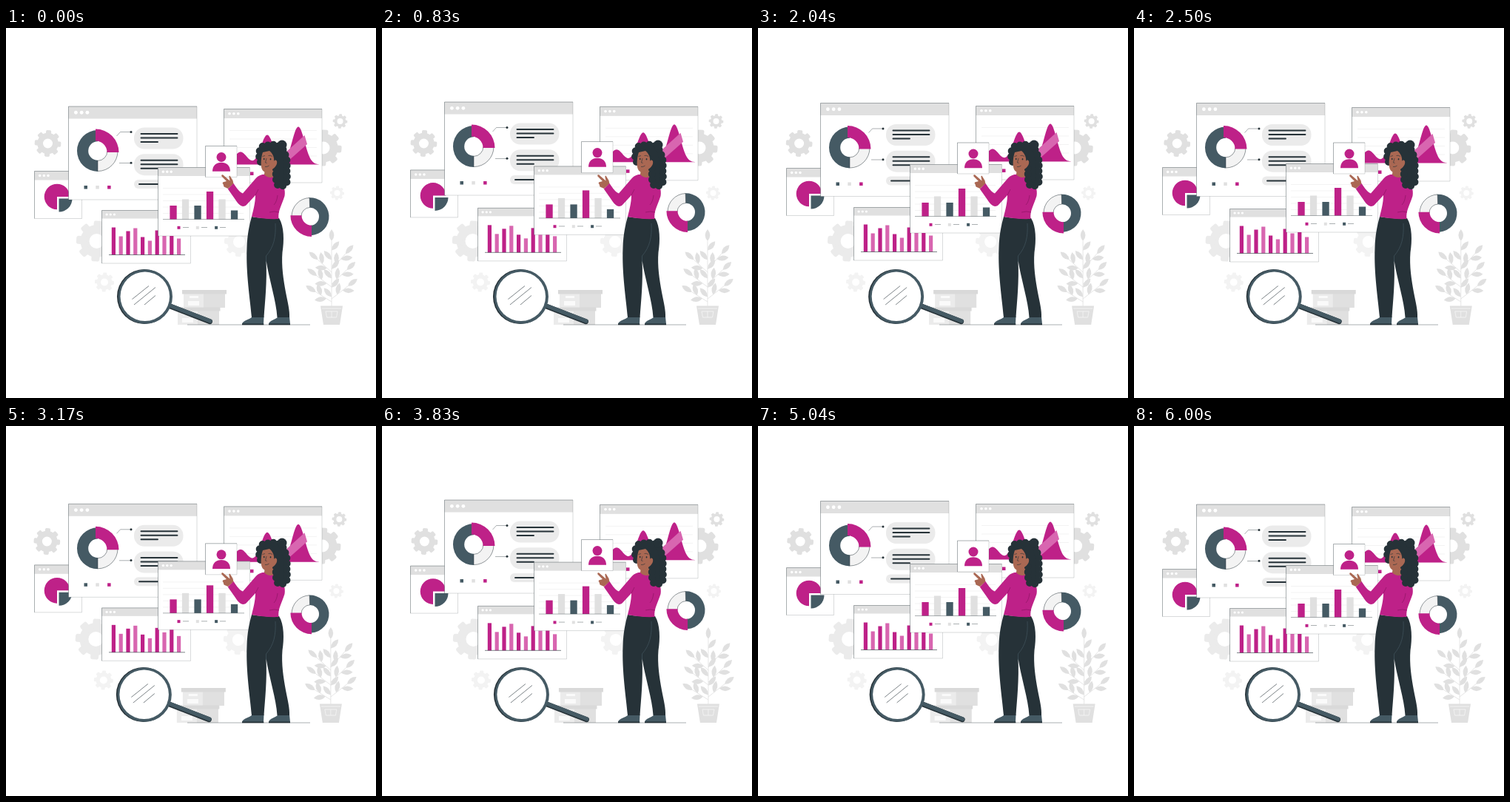
An HTML page for the animation above (6.04 s loop, 500 by 500 pixels).

```html
<!DOCTYPE html>
<html lang="en">
<head>
<meta charset="utf-8">
<title>Data dashboard</title>
<style>
  html, body { margin: 0; width: 100%; height: 100%; overflow: hidden; background: #fff; }
  svg { display: block; width: 100vw; height: 100vh; }
  .pink { fill: #be2188; }
  .tint { fill: #d866b0; }
  .slate { fill: #455a64; }
  .dark { fill: #263238; }
  .g1 { fill: #e0e0e0; }
  .g2 { fill: #ebebeb; }
  .g3 { fill: #f3f3f3; }
  .rim { fill: #f3f3f3; stroke: #263238; stroke-width: .5; }
  .white { fill: #fff; }
  .skin { fill: #aa6853; }
  .line { fill: none; stroke: #263238; stroke-width: .6; }
  .soft { fill: none; stroke: #263238; stroke-width: .6; opacity: .65; }
  .faint { fill: none; stroke: #263238; stroke-width: .35; opacity: .5; }
  .grid { fill: none; stroke: #ebebeb; stroke-width: .6; }
  .twig { fill: none; stroke: #e0e0e0; stroke-width: .8; }
  .text { fill: none; stroke: #263238; stroke-width: 1.9; stroke-linecap: round; }
  .hair { fill: #263238; stroke: #263238; stroke-width: 10; stroke-linecap: round; stroke-dasharray: 0 7.5; }
</style>
</head>
<body>
<svg viewBox="0 0 500 500">
  <g data-move="sway">
    <g id="gears"></g>
    <path class="g2" d="M240 359h56v19h-56zM232 381h56v20h-56z"/>
    <path class="g1" d="M267 359h29v19h-29zM259 381h29v20h-29z"/>
    <path fill="#d9d9d9" d="M238 354h60v5.500h-60zM231 377.500h58.500v5h-58.500z"/>
    <path class="white" opacity=".75" d="M248 362h12v3h-12zM246 369h15v6h-15zM239 385h12v3h-12zM238 392h15v6h-15z"/>
    <g id="plant"></g>
    <path class="g1" d="M425 375.500h30l-4 25.500h-22z"/>
    <path fill="none" stroke="#f5f5f5" stroke-width=".8" d="M427 379h26M432 383h16l-1.500 8h-13zM440 383v8"/>
  </g>

  <g data-move="float" data-period="6000" id="pie"></g>

  <g data-move="bob" data-period="1500" id="report">
    <path class="soft" d="M149.500 146L154.500 140.500H169M153 182.500H169"/>
    <circle class="dark" cx="169" cy="140.500" r="1.500"/>
    <circle class="dark" cx="169" cy="182.300" r="1.500"/>
    <g id="note">
      <rect class="g2" x="173" y="134.500" width="66.500" height="29" rx="14"/>
      <path class="text" d="M182.500 143h49m-49 5.500h49m-49 5.500h22.500"/>
    </g>
    <use href="#note" y="35.700"/>
    <rect class="g2" x="173" y="205" width="66.500" height="12" rx="6"/>
    <path class="text" d="M180 211h49"/>
  </g>

  <g data-move="float" data-period="3000" id="slim"></g>
  <g data-move="float" data-period="3000" id="curve"></g>
  <g data-move="float" data-period="6000" id="wide"></g>
  <g data-move="bob" data-period="1500" id="donut"></g>

  <g data-move="bob" data-period="1500">
    <rect class="white" x="269.500" y="159.500" width="42.500" height="42"/>
    <path class="soft" d="M269.500 201.500V159.500H312"/>
    <path class="faint" d="M312 159.500V201.500H269.500"/>
    <circle class="pink" cx="291" cy="174.500" r="6.500"/>
    <path class="pink" d="M279 193.800C279 186 284 181.800 291 181.800S303 186 303 193.800z"/>
  </g>

  <path class="soft" d="M245 401H411"/>

  <g data-move="sway">
    <path fill="none" stroke="#263238" stroke-width="7" stroke-linecap="round" d="M222 376L275.500 396.700"/>
    <path fill="none" stroke="#455a64" stroke-width="5.200" stroke-linecap="round" d="M224 376L276 396"/>
    <circle class="dark" cx="187" cy="363" r="37"/>
    <circle class="slate" cx="188.300" cy="363" r="36.700"/>
    <circle class="white" cx="187.800" cy="362.800" r="33.300"/>
    <path class="line" d="M170.500 366.500L193 348.500M173 374L202 350.500M187 374L202 361.500"/>
  </g>

  <g id="woman">
    <path class="skin" d="M300 217L307.500 210.500L306.500 206L302.500 199.500L301.300 200.500L302.500 206.500L293 198.300Q290.500 198 291.500 200.500L298 207L293 208.500Q292 210 293.500 211L294.500 214.500z"/>
    <path class="slate" d="M333 390H348.500L348 400H319C320 395 329 394.500 333 390zM368 390H383L384 400H355C356 395 364 394.500 368 390z"/>
    <path class="dark" d="M319 399.500h29.300v1.700h-29.300zM355 399.500h29v1.700h-29z"/>
    <path class="dark" d="M332 255C343 257 358 258 369 257C376 268 376 288 373.500 303C372 322 375 340 378 357C381 372 383.500 382 383 391H366.500C365 368 356 342 351.500 314C353 342 350 370 348.500 391H332C330 368 324 330 325.500 298C326 278 329 266 332 255z"/>
    <path fill="none" stroke="#455a64" stroke-width=".6" d="M364 264C365 282 362 296 351.500 308V316"/>
    <path class="pink" d="M348 198C355 195.500 364 197 369 204C375 211 378 219 376.500 227C373 239 367 247 368.500 258C357 258.500 343 257.500 332 255C334 247 337 236 337 226L325 239C320 243.500 315 240 310 232L299.800 217.500L307.500 210C312 217 316 222 320 223.500L336 205C340 200 344 198 348 198z"/>
    <path fill="none" stroke="#8f1565" stroke-width=".7" d="M337 226L341 218M369 249Q363 247 356 249M367 226Q366 235 362 239"/>
    <path class="skin" d="M350 188H363L365 199C361 203 353 203 349 198z"/>
    <path class="hair" d="M344 181C339 168 344 157 354 158.500C364 156 375 160 377 170C382 182 378 190 380 202C382 211 372 217 367 212C363 204 366 195 364 185L356 168z"/>
    <circle class="dark" cx="373" cy="158" r="6.500"/>
    <path class="skin" d="M347 168C344.500 175 343.500 187 346.500 192C350 197 357 195 361 190C364 188 367 184 366 180C365 178 363 178 362 180C363 175 360 169 356 166z"/>
    <path class="line" stroke-width=".9" d="M346.500 173.500L350 172.500M354.500 172.500Q357 171.500 360 173.500M352 176L350.500 182L352.500 182.500M350 187.500Q353 188 355.500 186"/>
    <ellipse class="dark" cx="348.700" cy="177" rx=".8" ry="1.200"/>
    <ellipse class="dark" cx="357.500" cy="177.200" rx=".8" ry="1.200"/>
  </g>
</svg>
<script>
const $ = id => document.getElementById(id);
const range = n => [...Array(n).keys()];

function make(tag, attrs) {
  const el = document.createElementNS('http://www.w3.org/2000/svg', tag);
  for (const key in attrs) el.setAttribute(key, attrs[key]);
  return el;
}

function add(parent, tag, attrs) {
  return parent.appendChild(make(tag, attrs));
}

function path(id, cls, d) {
  return add($(id), 'path', { class: cls, d });
}

function rect(id, cls, x, y, width, height) {
  return add($(id), 'rect', { class: cls, x, y, width, height });
}

function gear(cx, cy, r, hole, cls) {
  const g = add($('gears'), 'g', { class: cls, transform: `translate(${cx} ${cy})` });
  add(g, 'circle', { r: r * 0.8 });
  for (let a = 4; a < 360; a += 45)
    add(g, 'rect', { x: -r * 0.2, y: -r, width: r * 0.4, height: r / 2, rx: r * 0.1, transform: `rotate(${a})` });
  add(g, 'circle', { r: hole, class: 'white' });
}

// Browser window whose dots scale with the title bar; goes beneath existing content.
function panel(id, x, y, w, h, bar) {
  const g = make('g');
  add(g, 'rect', { class: 'white', x, y, width: w, height: h });
  add(g, 'rect', { class: 'g1', x, y, width: w, height: bar });
  add(g, 'path', { class: 'soft', d: `M${x} ${y + h}V${y}h${w}` });
  add(g, 'path', { class: 'faint', d: `M${x + w} ${y}v${h}h${-w}` });
  for (const i of range(3))
    add(g, 'circle', { class: 'white', cx: x + bar * (0.6 + i * 0.47), cy: y + bar / 2, r: bar * 0.145 });
  $(id).prepend(g);
}

// Ring sector; angles run clockwise from the top.
function ring(id, cls, cx, cy, r, hole, from, to) {
  const at = (radius, deg) => {
    const a = deg * Math.PI / 180;
    return `${cx + radius * Math.sin(a)} ${cy - radius * Math.cos(a)}`;
  };
  const big = to - from > 180 ? 1 : 0;
  path(id, cls, `M${at(r, from)}A${r} ${r} 0 ${big} 1 ${at(r, to)}L${at(hole, to)}A${hole} ${hole} 0 ${big} 0 ${at(hole, from)}z`);
}

function legend(id, x, y, gap, size, classes) {
  classes.forEach((cls, i) => rect(id, cls, x + i * gap, y, size, size));
}

function bars(id, x, base, gap, width, classes, heights) {
  heights.forEach((h, i) => rect(id, classes[i % classes.length], x + i * gap, base - h, width, h));
}

function gridLines(id, x, y, w, gap, count) {
  path(id, 'grid', range(count).map(i => `M${x} ${y + i * gap}h${w}`).join(''));
}

gear(56.5, 156, 17.8, 6.5, 'g1');
gear(122.5, 288, 27.5, 10, 'g2');
gear(133, 343.5, 13, 5, 'g3');
gear(429, 162, 24.5, 8.5, 'g1');
gear(451.5, 126, 9.8, 4, 'g1');
gear(447.5, 223, 9.5, 4, 'g3');
gear(315, 289, 20, 8, 'g3');

function leaf(x, y, angle, len) {
  const w = len * 0.42;
  path('plant', 'g1', `M0 0Q${len / 2} ${-w} ${len} 0Q${len / 2} ${w} 0 0z`)
    .setAttribute('transform', `translate(${x} ${y}) rotate(${angle})`);
}

// Twig leaning away from the stem with leaves on alternating sides and one at the tip.
function twig(y, angle, len, leaves) {
  const a = angle * Math.PI / 180;
  path('plant', 'twig', `M440 ${y}l${len * Math.cos(a)} ${len * Math.sin(a)}`);
  for (const i of range(leaves)) {
    const d = len * (i + 1) / leaves;
    const turn = i === leaves - 1 ? 0 : i % 2 ? 40 : -40;
    leaf(440 + d * Math.cos(a), y + d * Math.sin(a), angle + turn, 16);
  }
}

twig(376, -90, 88, 7);
for (const k of range(3)) {
  twig(326 + k * 20, -48 + k * 5, 28, 3);
  twig(330 + k * 20, -138 - k * 5, 25, 3);
}

panel('pie', 38.5, 193.5, 64, 64, 12);
ring('pie', 'pink', 69, 228, 17.3, 0, 180, 450);
ring('pie', 'slate', 71.5, 230.5, 18, 0, 90, 180);

panel('report', 84.5, 106, 173.5, 126, 16.5);
ring('report', 'slate', 124, 166, 28, 12.8, 180, 360);
ring('report', 'rim', 124, 166.5, 27, 12.8, 90, 180);
ring('report', 'pink', 121, 168, 31.5, 15.5, 0, 90);
legend('report', 105.5, 213, 15.8, 4.5, ['slate', 'g1', 'pink']);

panel('slim', 129.5, 246.5, 120, 71.5, 11);
bars('slim', 142.8, 306.5, 9.8, 5.2, ['pink', 'tint'], [37, 25, 32, 36, 24, 19, 33, 27, 31, 22]);
path('slim', 'line', 'M139 306.5H242');

panel('curve', 294.5, 109.5, 132.5, 99.5, 12.5);
gridLines('curve', 302, 138.5, 118, 11.5, 4);
const hump = (x, centre, height) => height * Math.exp(-(((x - centre) / 12) ** 2));
const wave = range(122).map(i => {
  const x = 302 + i;
  return `${x} ${184.5 - hump(x, 317, 17) - hump(x, 353, 40) - hump(x, 395, 51)}`;
});
path('curve', 'pink', `M302 184.5L${wave.join('L')}V184.5z`);
path('curve', 'tint', 'M378 168L403.5 145L407 157L381 180z');
rect('curve', 'pink', 330, 194.5, 4.5, 4.5);

panel('wide', 205.5, 188.5, 124, 92.5, 11.5);
gridLines('wide', 212, 216.5, 109, 8.5, 5);
bars('wide', 221.4, 258.5, 16.5, 9.3, ['pink', 'g1', 'slate'], [18.5, 27, 18.5, 37.5, 27, 12]);
path('wide', 'soft', 'M212 258.5H322M239 269.5h8m17 0h8m17 0h8');
legend('wide', 231.5, 267.8, 25.3, 4, ['pink', 'g1', 'slate']);

ring('donut', 'slate', 411, 254.8, 25.5, 12, -4, 176);
ring('donut', 'rim', 411, 254.5, 25, 12, 270, 358);
ring('donut', 'pink', 413, 253.3, 28.6, 13.5, 180, 270);

const LOOP = 6040, FPS = 24, RISE = 6;
const SWAY = [0, -1, 2, -4, 4, -4, 4, -4, 2, -1, 0];
const movers = [...document.querySelectorAll('[data-move]')];

const triangle = (t, period) => 1 - Math.abs(1 - 2 * (t % period) / period);
const smooth = p => (1 - Math.cos(p * Math.PI)) / 2;

const moves = {
  float: (t, period) => [0, -RISE * triangle(t, period)],
  bob: (t, period) => [0, -RISE * smooth(triangle(t, period))],
  sway: t => {
    const p = t % 6000 / 600, i = Math.floor(p);
    return [0.65 * (SWAY[i] + (SWAY[i + 1] - SWAY[i]) * (p - i)), 0];
  }
};

function draw(now) {
  const t = Math.floor(now % LOOP * FPS / 1000) * 1000 / FPS;
  for (const el of movers) {
    const { move, period } = el.dataset;
    el.setAttribute('transform', `translate(${moves[move](t, +period)})`);
  }
}

let start;
function tick(now) {
  start ??= now;
  draw(now - start);
  requestAnimationFrame(tick);
}
draw(0);
requestAnimationFrame(tick);
</script>
</body>
</html>
```
